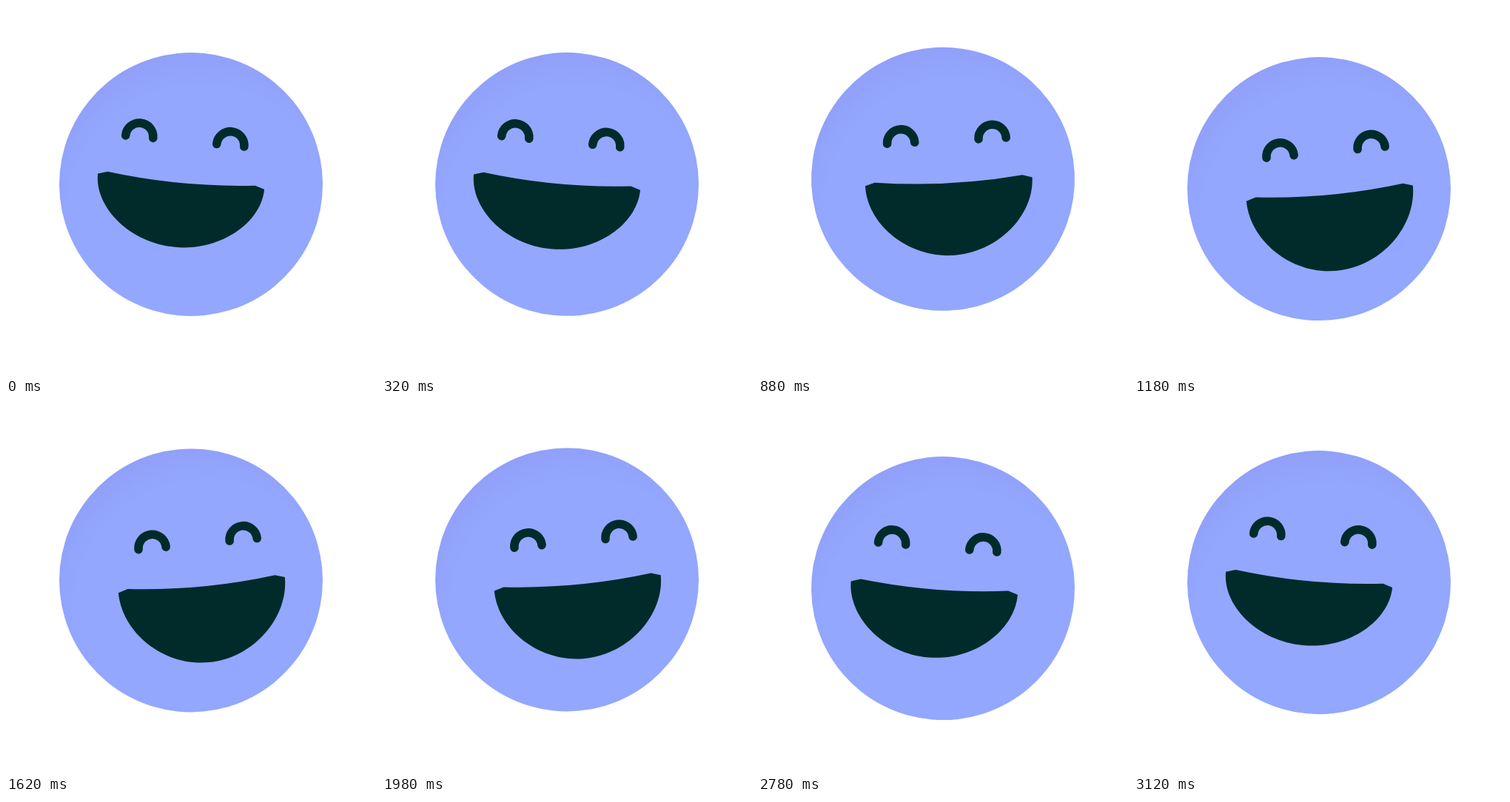
Write an HTML page that moves like this. It is 500 by 500 pixels and loops after 3.14 s.

```html
<!DOCTYPE html>
<html lang="en">
<head>
<meta charset="utf-8">
<title>Laughing face</title>
<style>
  html, body { margin: 0; width: 100%; height: 100%; overflow: hidden; background: #fff; }
  svg { display: block; width: 100%; height: 100%; }
</style>
</head>
<body>
<svg viewBox="0 0 500 500">
  <defs>
    <radialGradient id="skin" gradientUnits="userSpaceOnUse" cx="18" cy="46" r="230">
      <stop offset="0.78" stop-color="#93a7ff"/>
      <stop offset="1" stop-color="#919ff8"/>
    </radialGradient>
    <path id="eye" d="M-18.6 0a18.6 18.6 0 0 1 37.2 0"
      fill="none" stroke="#002b2a" stroke-width="11.6" stroke-linecap="round"/>
  </defs>
  <g id="body">
    <circle r="178" fill="url(#skin)"/>
    <g id="eyes">
      <use href="#eye" x="-61.8"/>
      <use href="#eye" x="61.8"/>
    </g>
    <path id="mouth" fill="#002b2a"/>
  </g>
</svg>
<script>
const LOOP = 3140, STEP = 20;
const HOP_RIGHT = 340, HOP_LEFT = 2140;   // start of each hop, ms
const REST = 1000, BEAT = 400;            // chuckling after a hop

const { PI, cos, sin } = Math;
const [body, eyes, mouth] = ['body', 'eyes', 'mouth'].map(id => document.getElementById(id));

// Smooth 0-1-0 around a centre
const bump = (t, centre, half) =>
  Math.abs(t - centre) < half ? (1 + cos(PI * (t - centre) / half)) / 2 : 0;

// Smooth 0-1 over a duration
const ease = (t, start, length) =>
  (1 - cos(PI * Math.min(1, Math.max(0, (t - start) / length)))) / 2;

// Small bounces that fill the rest before the next hop
function chuckle(since, span) {
  if (since < REST) return 0;
  const beats = Math.round((span - REST) / BEAT);
  return sin(PI * beats * (since - REST) / (span - REST)) ** 2;
}

function draw(t) {
  const right = t >= HOP_RIGHT && t < HOP_LEFT;
  const away = HOP_LEFT - HOP_RIGHT;
  const since = right ? t - HOP_RIGHT : (t - HOP_LEFT + LOOP) % LOOP;
  const turnAt = 60, turnTime = 700;

  const squash = bump(since, 200, 195);
  const swing = bump(since, 295, 140);
  const leap = bump(since, 460, 180);
  const land = bump(since, 720, 280);
  const laugh = chuckle(since, right ? away : LOOP - away);
  const turn = (right ? 1 : -1) * (2 * ease(since, turnAt, turnTime) - 1) * 0.98;
  const wave = -cos(2 * PI * t / LOOP);

  const y = 241 + 25 * squash - 17 * leap + 10 * land - 4 * laugh;
  const drop = 2.5 + 5 * wave + 26 * swing + 2 * land;
  const open = 97 + 8 * wave + 12 * swing + 4 * land - 5 * squash;
  const s = 0.05 * squash, x = 14 * turn;

  body.setAttribute('transform',
    `translate(250 ${y}) rotate(${-5.5 * turn}) scale(${1 + s} ${1 - s})`);
  eyes.setAttribute('transform', `translate(${x} ${0.93 * drop - 55.2})`);
  mouth.setAttribute('transform', `translate(${x} ${drop})`);
  mouth.setAttribute('d', `M-113 0L-100-4Q0 8 100-4L113 0
    C113 ${0.51 * open} 62 ${open} 0 ${open}S-113 ${0.51 * open}-113 0Z`);
}

const start = performance.now();
function tick() {
  const t = (performance.now() - start) % LOOP;
  draw(Math.floor(t / STEP) * STEP);
  requestAnimationFrame(tick);
}
draw(0);
requestAnimationFrame(tick);
</script>
</body>
</html>
```
